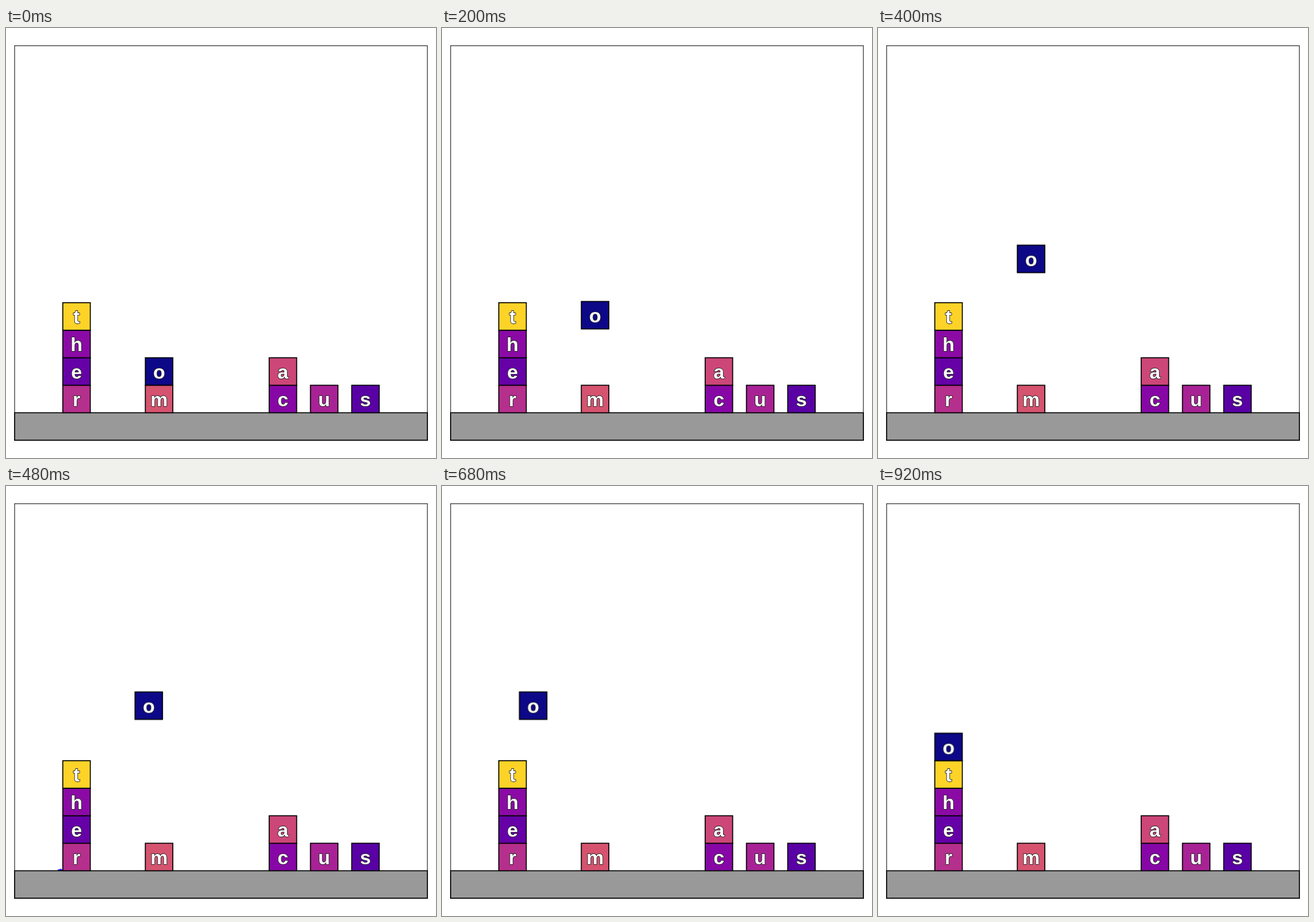
These frames come from a looping animation (748 px wide and 748 px high, 0.96 s). An HTML page:

```html
<!DOCTYPE html>
<html lang="en">
<head>
<meta charset="utf-8">
<title>Stacking letter blocks</title>
<style>
  html, body { margin: 0; width: 100%; height: 100%; overflow: hidden; background: #fff; }
  svg { display: block; width: 748px; height: 748px; }
  .block rect { stroke: #000; stroke-width: 1.7; }
  text {
    font: bold 34px "Liberation Sans", Arial, Helvetica, sans-serif;
    text-anchor: middle;
    fill: #fff;
    stroke: #222;
    stroke-width: 1.8;
    stroke-linejoin: round;
    paint-order: stroke;
  }
  /* lift 4.5 cells, carry 3 cells left, lower 1.5 cells, one step per 40 ms */
  #mover { animation: carry 960ms infinite; }
  @keyframes carry {
    0%            { transform: translate(0, 0); animation-timing-function: steps(11); }
    45.8333%      { transform: translate(0, -215.4px); animation-timing-function: steps(8); }
    79.1666%      { transform: translate(-143.6px, -215.4px); animation-timing-function: steps(4); }
    95.8333%, to  { transform: translate(-143.6px, -143.6px); }
  }
  #speck { animation: blink 960ms step-end infinite; }
  @keyframes blink {
    0%       { opacity: 0; }
    50%      { opacity: 1; }
    54.1666% { opacity: 0; }
  }
</style>
</head>
<body>
<svg id="stage" viewBox="0 0 748 748">
  <rect x="15" y="30.8" width="718" height="686.3" fill="#fff" stroke="#333" stroke-width="1.3"/>
  <path id="speck" d="M90 667h3v-1h4v1h1v2.5h-8z" fill="#2a2af5"/>
  <rect x="15" y="669.3" width="718" height="47.8" fill="#999" stroke="#000" stroke-width="1.7"/>
</svg>
<script>
  const CELL = 718 / 15, LEFT = 15, FLOOR = 669.3;
  const stage = document.getElementById("stage");

  // Each column lists its blocks from the floor up.
  const columns = {
    1: [["r", "#b52f8c"], ["e", "#6600a7"], ["h", "#8b0aa5"], ["t", "#fdd328"]],
    3: [["m", "#d5536f"], ["o", "#0d0887"]],
    6: [["c", "#8707a6"], ["a", "#cc4778"]],
    7: [["u", "#a82296"]],
    8: [["s", "#5901a5"]]
  };

  function add(parent, tag, attrs) {
    const el = document.createElementNS("http://www.w3.org/2000/svg", tag);
    for (const key in attrs) el.setAttribute(key, attrs[key]);
    return parent.appendChild(el);
  }

  function addBlock(letter, fill, col, row) {
    const mid = LEFT + (col + 0.5) * 1.5 * CELL;
    const top = FLOOR - (row + 1) * CELL;
    const block = add(stage, "g", { class: "block" });
    add(block, "rect", { x: mid - CELL / 2, y: top, width: CELL, height: CELL, fill });
    add(block, "text", { x: mid, y: top + 36.2 }).textContent = letter;
    if (letter === "o") block.id = "mover";
  }

  for (const col in columns)
    columns[col].forEach(([letter, fill], row) => addBlock(letter, fill, +col, row));
</script>
</body>
</html>
```
